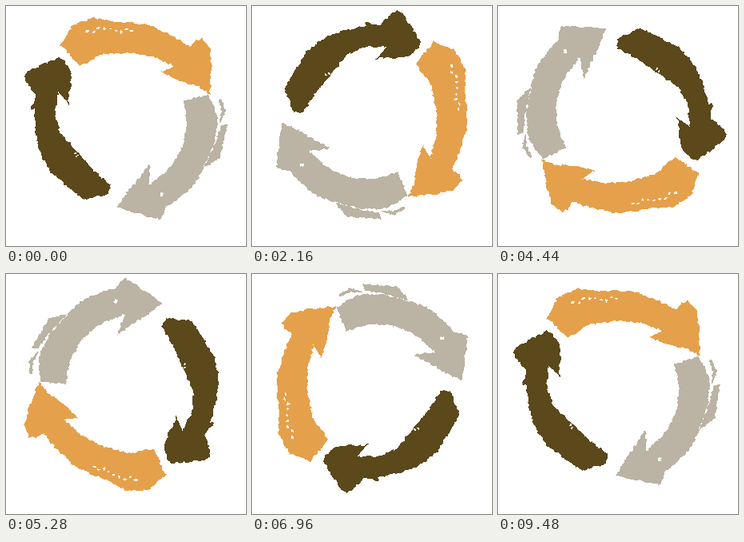
Recreate the animation shown at these times as an HTML page. Size 300 by 300 pixels, loop 9600 ms.

```html
<!DOCTYPE html>
<html>
<head>
<meta charset="utf-8">
<style>
html, body { margin: 0; width: 100%; height: 100%; overflow: hidden; background: #fff; }
svg { display: block; width: 100vw; height: 100vh; }
</style>
</head>
<body>
<svg viewBox="0 0 300 300" shape-rendering="crispEdges"><g id="ring" fill-rule="evenodd"></g></svg>
<script>
const STEP = 120, STEPS = 80, CX = 150, CY = 139.5;
const ring = document.getElementById('ring');

let seed = 7;
const random = () => (seed = seed * 16807 % 2147483647) / 2147483647;
const noise = size => (random() - .5) * size;

const polar = ([angle, r]) => {
  const a = angle * Math.PI / 180;
  return [CX + r * Math.cos(a), CY + r * Math.sin(a)];
};

// Spreads radii evenly over the angles from one end to the other.
const arc = (from, to, radii) =>
  radii.map((r, i) => [from + (to - from) * i / (radii.length - 1), r]);

// Splits a polar outline into short pieces and shakes them for a dry-brush edge.
function rough(outline, size = 2.6) {
  const points = outline.map(polar), out = [];
  points.forEach(([x, y], i) => {
    const [u, v] = points[(i + 1) % points.length];
    const n = Math.ceil(Math.hypot(u - x, v - y) / 2.5);
    for (let k = 0; k < n; k++) {
      const px = x + (u - x) * k / n + noise(size);
      const py = y + (v - y) * k / n + noise(size);
      out.push(px.toFixed(1) + ' ' + py.toFixed(1));
    }
  });
  return 'M' + out.join('L') + 'Z';
}

// A brush stroke: outer edge, head and inner edge back to the tail.
function stroke(tail, outerEnd, outer, head, innerEnd, inner) {
  return rough([...arc(tail, outerEnd, outer), ...head, ...arc(innerEnd, tail, inner)]);
}

// Gaps in the paint along an arc.
function gaps(count, from, to, r0, r1) {
  let d = '';
  for (let i = 0; i < count; i++) {
    const t = i / count;
    const a = from + (to - from) * t, r = r0 + (r1 - r0) * t + noise(7);
    const w = .7 + random(), h = 1 + random() * 2;
    d += rough([[a - w, r], [a, r + h], [a + w, r], [a, r - h]], 1.2);
  }
  return d;
}

function paint(color, ...parts) {
  const path = document.createElementNS(ring.namespaceURI, 'path');
  path.setAttribute('fill', color);
  path.setAttribute('d', parts.join(''));
  ring.append(path);
}

paint('#e5a04b',
  stroke(228, 312, [122, 134, 131, 120, 119, 119, 118, 119],
    [[312, 131], [314, 137], [321, 136], [332, 121], [344, 109], [335, 95], [325, 81], [307, 72]],
    314, [89, 83, 81, 84, 87]),
  gaps(9, 246, 277, 117, 107));

paint('#5b481b',
  stroke(103, 185, [98, 115, 113, 116, 116, 115, 115],
    [[185, 120], [194, 116], [198, 128], [202, 138], [206, 134], [216, 119],
     [222, 112], [223, 106], [219, 88], [212, 81], [193, 74]],
    201, [90, 89, 85, 76, 74, 78, 87]),
  gaps(2, 142, 148, 81, 79));

paint('#bbb3a3',
  stroke(-16, 59, [106, 115, 115, 115, 120, 121],
    [[66, 122], [71, 135], [81, 123], [96, 112], [91, 98], [84, 85], [74, 73], [62, 64]],
    71, [89, 83, 80, 77, 75]),
  stroke(-11, 3, [122, 125, 119], [], 3, [117, 120, 117]),
  stroke(4, 33, [127, 126, 128, 115], [], 33, [114, 115, 116, 120]),
  gaps(1, 65, 65, 104, 104));

const start = performance.now();
function draw() {
  const step = Math.floor(Math.max(0, performance.now() - start) / STEP) % STEPS;
  ring.setAttribute('transform', `rotate(${step * 360 / STEPS} ${CX} ${CY})`);
  requestAnimationFrame(draw);
}
draw();
</script>
</body>
</html>
```
